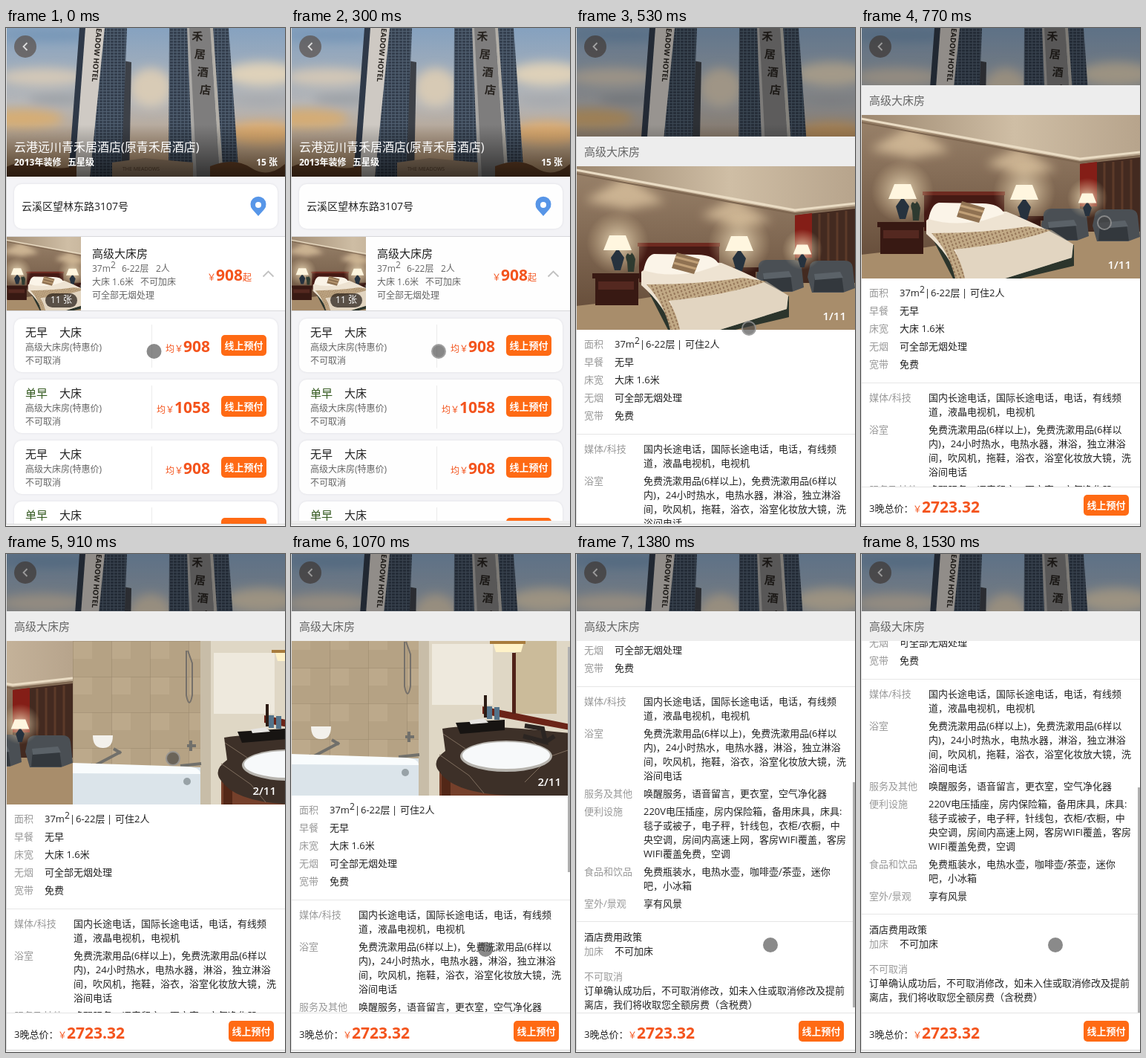
These frames come from a looping animation (376 px wide and 670 px high, 1610 ms). An HTML page:

```html
<!DOCTYPE html>
<html lang="zh">
<head>
<meta charset="utf-8">
<title>房型详情</title>
<style>
html, body { margin: 0; width: 100%; height: 100%; overflow: hidden; background: #f4f4f4; }
body { position: relative; font-family: "Open Sans", "Noto Sans CJK SC", "Noto Sans CJK", sans-serif; }
div, p, svg { position: absolute; box-sizing: border-box; }
p { margin: 0; line-height: 20px; white-space: pre; }
sup { position: relative; top: -5px; font-size: 12px; line-height: 0; vertical-align: baseline; }
b { font-size: 21px; }
#view { left: 0; top: 0; width: 376px; height: 667px; overflow: hidden; background: #f4f4f7; }
#edge { left: 0; top: 0; width: 1px; height: 667px; background: #dcdcdc; }
#foot { left: 0; top: 667px; width: 376px; height: 3px; border-top: 1px solid #d6d6d6; }
.card { left: 11px; width: 355px; background: #fff; border-radius: 10px; box-shadow: 0 0 3px #dcdce2; }
.button { width: 61px; height: 28px; border-radius: 5px; background: #ff6a14; color: #fff;
  font-size: 13px; font-weight: 700; line-height: 28px; text-align: center; }
.rule { height: 1px; left: 0; width: 376px; background: #e6e6e6; }
#page { width: 376px; }
#room { left: 0; top: 280px; width: 376px; height: 101px; background: #fff;
  border: solid #d9d9dc; border-width: 1px 0; }
#badge { left: 53px; top: 357px; width: 43px; height: 19px; border-radius: 10px; background: #1c1510b0;
  color: #fff; font-size: 12px; line-height: 18px; text-align: center; }
#dim { inset: 0; background: #000; }
#sheet { left: 0; top: 77px; width: 376px; height: 590px; background: #fff; }
#head { width: 376px; height: 40px; background: #ededed; }
#scroll { top: 40px; width: 376px; height: 500px; overflow: hidden; }
#body { width: 376px; height: 809px; }
#slides { width: 376px; height: 220px; overflow: hidden; }
#count { right: 12px; top: 191px; font-size: 15px; font-weight: 600; color: #fff; }
#thumb { left: 373px; width: 3px; height: 303px; background: #b0b0b0; }
#bar { top: 540px; width: 376px; height: 50px; background: #fff; border-top: 1px solid #e4e4e4; }
#touch { width: 20px; height: 20px; margin: -10px; border-radius: 50%; background: #444444a0; }
#touch.down { background: #404040a0; border: 2px solid #b0b0b0a0; }
</style>
</head>
<body>
<svg width="0" height="0">
  <defs>
    <filter id="soft" x="-50%" y="-50%" width="200%" height="200%"><feGaussianBlur stdDeviation="7"/></filter>
    <linearGradient id="sky" x2="0" y2="1">
      <stop stop-color="#86a2c0"/><stop offset=".5" stop-color="#b5b6b8"/><stop offset="1" stop-color="#bd9468"/>
    </linearGradient>
    <linearGradient id="shade" x2="0" y2="1">
      <stop offset=".65" stop-opacity="0"/><stop offset="1" stop-opacity=".6"/>
    </linearGradient>
    <linearGradient id="wall" x2="0" y2="1"><stop stop-color="#9a836b"/><stop offset=".9" stop-color="#664d3a"/></linearGradient>
    <linearGradient id="ceiling"><stop stop-color="#9c876f"/><stop offset=".55" stop-color="#cfbea5"/><stop offset="1" stop-color="#b7a48c"/></linearGradient>
    <radialGradient id="glow"><stop stop-color="#fff0cf"/><stop offset="1" stop-color="#e8cfa4" stop-opacity="0"/></radialGradient>
    <pattern id="glass" width="5" height="4" patternUnits="userSpaceOnUse">
      <path fill="#343f4e" d="M0 0h5v4H0z"/><path fill="#516071" d="M0 0h5v1H0zM0 0h1v4H0z"/>
    </pattern>
    <pattern id="weave" width="5" height="5" patternUnits="userSpaceOnUse" patternTransform="rotate(-20)">
      <path fill="#c2aa86" d="M0 0h5v5H0z"/><path fill="#96775a" d="M0 0h2v3H0z"/>
    </pattern>
    <pattern id="tile" width="52" height="48" patternUnits="userSpaceOnUse">
      <path fill="#b5a284" d="M0 0h52v48H0z"/><path fill="#bca98b" d="M0 0h26v24H0z"/>
      <path stroke="#98866b" d="M0 0h52M0 0v48" fill="none"/>
    </pattern>
    <g id="lamp">
      <circle r="42" fill="url(#glow)" opacity=".8"/>
      <path fill="#fff6df" d="M-11-10h22l8 20h-38z"/>
      <path fill="#26323e" d="M-2 10h4l7 10-5 17h-8l-5-17z"/>
    </g>
    <g id="chair">
      <path fill="#4a4f54" d="M3 8q1-8 12-8h35q10 0 11 9l3 28-16 6H6L0 22z"/>
      <path fill="#33383d" d="M10 20h36l3 22H8z"/><path fill="#5b6268" d="M9 18l35-3 4 8-38 3z"/>
    </g>
  </defs>
  <symbol id="hotel" viewBox="0 0 376 200">
    <path fill="url(#sky)" d="M0 0h376v200H0z"/>
    <g filter="url(#soft)">
      <ellipse cx="50" cy="66" rx="58" ry="12" fill="#d3c8b8"/><ellipse cx="22" cy="122" rx="55" ry="13" fill="#d6ad74"/>
      <ellipse cx="70" cy="96" rx="40" ry="7" fill="#9ba0a6"/><ellipse cx="195" cy="80" rx="28" ry="26" fill="#d8cbb6"/>
      <ellipse cx="345" cy="62" rx="50" ry="16" fill="#dfd2ba"/><ellipse cx="345" cy="98" rx="45" ry="7" fill="#a6a9ad"/>
      <ellipse cx="345" cy="142" rx="48" ry="16" fill="#dfae72"/><ellipse cx="60" cy="10" rx="70" ry="7" fill="#7595b6"/>
    </g>
    <path fill="#3d4148" d="M158 44l11 2-3 154h-18z"/>
    <path fill="url(#glass)" d="M132 0h31l-8 200h-42z"/>
    <path fill="#2f3948" d="M99 0h9L93 200h-9z"/>
    <path fill="#cfcac4" d="M107 0h26l-20 200H92z"/>
    <path fill="url(#glass)" d="M220 0h80l14 200h-95z"/>
    <path fill="#aaa8a5" d="M244 0h5l10 200h-7z"/><path fill="#7e7d7d" d="M247 0h28l13 200h-31z"/>
    <path fill="#b3afa8" d="M275 0h4l14 200h-5z"/>
    <g font-weight="700" fill="#27231f">
      <text font-size="10" transform="translate(122 0)rotate(95)">EADOW HOTEL</text>
      <g id="sign" font-size="15"></g>
    </g>
    <path fill="#998169" d="M143 181l44-6 65 6v19H143z"/>
    <text x="157" y="192" font-size="7" fill="#5b442f">THE MEADOWS</text>
    <path fill="#6a4327" d="M0 187q25-12 50-3t45 0v16H0zM275 186q32-13 55 2t46-5v17H275z"/>
    <path fill="url(#shade)" d="M0 0h376v200H0z"/>
  </symbol>
  <symbol id="bedroom" viewBox="0 0 376 220">
    <path fill="url(#wall)" d="M0 0h376v220H0z"/>
    <path fill="#a88d6b" d="M0 188l88-10 155-25 133-3v70H0z"/>
    <g filter="url(#soft)" fill="#e0c7a3" opacity=".75"><path d="M68 14l52 34-52 10-56-12zM215 42l48 32-45 8-50-16z"/></g>
    <path fill="url(#ceiling)" d="M0 0h376v54l-81 8L0 7z"/>
    <path fill="none" stroke="#eadcc4" stroke-width="3" d="M0 5l295 54 81-9"/>
    <path fill="none" stroke="#7d6650" stroke-width="2" d="M0 10l295 54 81-9"/>
    <path fill="#432a20" d="M295 66l81-9v100h-81z"/><path fill="#841e17" d="M295 66l23-3v60h-23z"/>
    <path stroke="#5c3a29" stroke-width="3" d="M328 64v74m12-75v70m12-71v70m12-72v70"/>
    <use href="#chair" x="243" y="126"/><use href="#chair" x="312" y="127"/>
    <path fill="#451a14" d="M85 104h108v52H85z"/><path fill="#6d2a20" d="M83 103h111v5H83z"/>
    <path fill="#381913" d="M22 144h66v7H22zm4 7h58v36H26zM196 136h50v6h-50zm8 6h38v20h-38z"/>
    <path fill="#542820" d="M30 155h48v11H30z"/>
    <use href="#lamp" x="56" y="103"/><use href="#lamp" x="220" y="104"/>
    <use href="#lamp" transform="translate(305 112)scale(.65)"/>
    <path fill="#2e3a30" d="M69 129q-4-9 1-12 4 5 5-1 4 4 5 9l-2 17h-8z"/>
    <path fill="#2c352c" d="M88 150l36 70h91l72-17v-28z"/>
    <path fill="#eee3d2" d="M88 142l22-16 86 4q50 20 90 44l-2 18-90 28h-64q-10-32-42-60z"/>
    <path fill="#d9cab5" d="M128 183l-3-4q80-8 132-24l29 19-2 18-90 28h-58z" opacity=".55"/>
    <path fill="#fbf4e8" d="M91 140q4-20 14-22l58 1q24 0 30 14l-28 9q-42 8-74-2z"/>
    <path fill="url(#weave)" d="M95 159q70 0 130-9l32 5q-50 18-132 26 11 18 15 39h-13q-9-37-32-61z"/>
    <path fill="#907252" d="M136 116l31 9-8 20-30-8z"/><path stroke="#c1a077" stroke-width="3" d="M134 122l31 8m-33 0l30 8"/>
  </symbol>
  <symbol id="bathroom" viewBox="0 0 376 220">
    <path fill="url(#tile)" d="M0 0h172v220H0z"/>
    <path fill="#dfd7c5" d="M172 0h204v220H172z"/><path fill="#c8bda8" d="M172 0h14v220h-14z"/>
    <path fill="#eee9dd" d="M190 16h82v82h-82z"/>
    <path fill="#cbbb9a" d="M302 0h56v110h-56z"/>
    <path fill="#6b2418" d="M258 100l118 24v8l-118-22z"/><path fill="#512219" d="M298 28h5v82h-5z"/>
    <path fill="#fff2c8" d="M272 13h42l-4 14h-34z"/><path fill="#a87c3d" d="M268 12h48v4h-48z"/>
    <path fill="none" stroke="#75706a" stroke-width="2" d="M153 13v60q4 20 8 0V30l-6-17"/>
    <path fill="#f3f1ec" d="M27 127h27q0 18-14 17-13 0-13-17z"/>
    <path fill="none" stroke="#71706b" stroke-width="4" d="M27 169l38-20m-10-4l10 6M24 166l9 6M154 141h12m-7-7v14m-14 20l28-3"/>
    <path fill="#dbe4ea" d="M0 166l172 4v50H0z"/><path fill="#f9fcfd" d="M0 164l155 5q17 1 17 10L0 178z"/>
    <circle cx="154" cy="189" r="5" fill="#98a2a7"/>
    <path fill="#75402b" d="M200 170h176v50H200z"/><path fill="#522717" d="M203 180h12v40h-12z"/>
    <path fill="#3d3028" d="M204 130q40-8 172 6v84H300q-80-2-100-32-12-14 8-28z"/>
    <path fill="none" stroke="#7f6e5e" d="M200 165l40 28 20 24m-55-80l30 20m80 45l35-35 26-9m-60-18l25 20"/>
    <ellipse cx="290" cy="167" rx="62" ry="21" fill="#b7b4ae"/><ellipse cx="290" cy="166" rx="59" ry="18" fill="#f7f9fa"/>
    <path fill="#171412" d="M222 122l66-4v14l-60 5z"/><path fill="#e7e5e2" d="M240 119l20-3 6 6-24 2z"/>
    <path fill="#54738a" d="M264 100h7v17h-7zm10 1h7v17h-7z"/><path fill="#2b1b14" d="M260 85h4v30h-4z"/>
    <path fill="none" stroke="#2b2522" stroke-width="6" d="M315 126l24 4 4 18-30-8m30 8l12-8"/>
  </symbol>
</svg>

<div id="view">
  <div id="page">
    <svg width="376" height="200"><use href="#hotel"/></svg>
    <div class="card" style="top:210px;height:60px"></div>
    <div id="room"></div>
    <svg style="left:1px;top:281px" width="100" height="99" viewBox="25 0 220 218"><use href="#bedroom" width="376" height="220"/></svg>
    <div id="badge">11 张</div>
    <svg width="376" height="400" fill="none">
      <circle cx="26" cy="25" r="15" fill="#5a514bb8"/>
      <path d="M28.500 20l-5 5 5 5" stroke="#ddd" stroke-width="1.800"/>
      <path d="M340 253l-8-9a10.500 10.500 0 1 1 16 0z" fill="#5796e8"/><circle cx="340" cy="238" r="4" fill="#fff"/>
      <path d="M346.500 334.500l7-7 7 7" stroke="#c2c2c2" stroke-width="1.800"/>
    </svg>
  </div>
  <div id="dim"></div>
  <div id="sheet">
    <div id="head"></div>
    <div id="scroll">
      <div id="body">
        <div id="slides">
          <svg id="first" width="376" height="220"><use href="#bedroom"/></svg>
          <svg id="second" width="376" height="220"><use href="#bathroom"/></svg>
          <p id="count"></p>
        </div>
      </div>
      <div id="thumb"></div>
    </div>
    <div id="bar"></div>
  </div>
  <div id="touch"></div>
</div>
<div id="edge"></div>
<div id="foot"></div>

<script>
const $ = id => document.getElementById(id);
const add = (box, html) => box.insertAdjacentHTML('beforeend', html);
const INK = '#222', GRAY = '#666', PALE = '#999', HOT = '#f4541d', BOLD = 'font-weight:700';

// y is the middle of the line; a negative x counts from the right edge
function text(box, x, y, size, color, html, more = '') {
  const side = x < 0 ? `right:${-x}px` : `left:${x}px`;
  add(box, `<p style="${side};top:${y - 10}px;font-size:${size}px;color:${color};${more}">${html}</p>`);
}
const button = (box, x, y) => add(box, `<div class="button" style="left:${x}px;top:${y}px">线上预付</div>`);

const page = $('page'), sheet = $('sheet'), body = $('body');

[...'禾居酒店'].forEach((c, i) =>
  add($('sign'), `<text transform="translate(${250 + i * 3.6} ${16 + i * 24})rotate(5)">${c}</text>`));

text(page, 11, 160, 16, '#fff', '云港远川青禾居酒店(原青禾居酒店)');
text(page, 11, 181, 12, '#fff', '2013年装修', BOLD);
text(page, 83, 181, 12, '#fff', '五星级', BOLD);
text(page, -10, 181, 12, '#fff', '15 张', BOLD);
text(page, 21, 240, 14, INK, '云溪区望林东路3107号');
text(page, 116, 303, 15, INK, '高级大床房');
text(page, 116, 324, 12, GRAY, '37m<sup>2</sup>');
text(page, 156, 324, 12, GRAY, '6-22层');
text(page, 202, 324, 12, GRAY, '2人');
text(page, 116, 342, 12, GRAY, '大床 1.6米');
text(page, 181, 342, 12, GRAY, '不可加床');
text(page, 116, 360, 12, GRAY, '可全部无烟处理');
text(page, -45, 332, 12, HOT, '￥<b>908</b>起');

[908, 1058, 908, 1058].forEach((price, i) => {
  const y = 391 + i * 82, meal = i % 2;
  add(page, `<div class="card" style="top:${y}px;height:72px"></div>
    <div style="left:196px;top:${y + 8}px;width:1px;height:58px;background:#ececec"></div>`);
  text(page, 26, y + 18, 15, meal ? '#33591f' : INK, meal ? '单早' : '无早');
  text(page, 72, y + 18, 15, INK, '大床');
  text(page, 26, y + 39, 12, GRAY, '高级大床房(特惠价)');
  text(page, 26, y + 57, 12, GRAY, '不可取消');
  text(page, -101, y + 37, 12, HOT, `均￥<b>${price}</b>`);
  button(page, 290, y + 22);
});

text(sheet, 11, 20, 15, GRAY, '高级大床房');
text(sheet, 11, 569, 13, INK, '3晚总价：');
text(sheet, 70, 567, 12, HOT, '￥<b>2723.32</b>');
button(sheet, 300, 551);

[['面积', '37m<sup>2</sup>'], ['早餐', '无早'], ['床宽', '大床 1.6米'], ['无烟', '可全部无烟处理'], ['宽带', '免费']]
  .forEach(([label, value], i) => {
    text(body, 11, 239 + i * 24, 13, PALE, label);
    text(body, 52, 239 + i * 24, 13, INK, value);
  });
text(body, 86, 239, 13, INK, '|');
text(body, 94, 239, 13, INK, '6-22层');
text(body, 136, 239, 13, INK, '|');
text(body, 147, 239, 13, INK, '可住2人');

let y = 380;
for (const [label, ...lines] of [
  ['媒体/科技', '国内长途电话，国际长途电话，电话，有线频', '道，液晶电视机，电视机'],
  ['浴室', '免费洗漱用品(6样以上)，免费洗漱用品(6样以', '内)，24小时热水，电热水器，淋浴，独立淋浴',
    '间，吹风机，拖鞋，浴衣，浴室化妆放大镜，洗', '浴间电话'],
  ['服务及其他', '唤醒服务，语音留言，更衣室，空气净化器'],
  ['便利设施', '220V电压插座，房内保险箱，备用床具，床具:', '毯子或被子，电子秤，针线包，衣柜/衣橱，中',
    '央空调，房间内高速上网，客房WIFI覆盖，客房', 'WIFI覆盖免费，空调'],
  ['食品和饮品', '免费瓶装水，电热水壶，咖啡壶/茶壶，迷你', '吧，小冰箱'],
  ['室外/景观', '享有风景'],
]) {
  text(body, 11, y, 13, PALE, label);
  lines.forEach((line, i) => text(body, 91, y + i * 19, 13, INK, line));
  y += 24 + 19 * (lines.length - 1);
}
add(body, '<div class="rule" style="top:360px"></div><div class="rule" style="top:676px"></div>');
text(body, 11, 697, 13, INK, '酒店费用政策');
text(body, 11, 716, 13, PALE, '加床');
text(body, 52, 716, 13, INK, '不可加床');
text(body, 11, 750, 13, PALE, '不可取消');
text(body, 11, 769, 13, INK, '订单确认成功后，不可取消修改，如未入住或取消修改及提前');
text(body, 11, 788, 13, INK, '离店，我们将收取您全额房费（含税费）');

const LOOP = 1610;
// the picture is held until the next of these times
const TICKS = [0, 130, 300, 380, 450, 530, 590, 680, 770, 830, 910, 990, 1070, 1150, 1210, 1300, 1380, 1450, 1530];
const PATH = [[0, 199.5, 435], [300, 199, 435], [380, 198, 434], [530, 233, 404], [770, 328, 262],
  [830, 285, 262], [910, 225, 275], [990, 240, 410], [1070, 262, 532], [1210, 262, 526], [LOOP, 262, 526]];

// cubic-bezier(.25, .1, .25, 1)
function ease(p) {
  if (p <= 0) return 0;
  if (p >= 1) return 1;
  const curve = (u, a, b) => 3 * (1 - u) ** 2 * u * a + 3 * (1 - u) * u * u * b + u ** 3;
  let lo = 0, hi = 1;
  for (let i = 0; i < 20; i++) {
    const mid = (lo + hi) / 2;
    if (curve(mid, .25, .25) < p) lo = mid; else hi = mid;
  }
  return curve(lo, .1, 1);
}

function touchAt(t) {
  const i = PATH.findIndex(k => k[0] > t), [t0, x0, y0] = PATH[i - 1], [t1, x1, y1] = PATH[i];
  const p = (t - t0) / (t1 - t0);
  return [x0 + (x1 - x0) * p, y0 + (y1 - y0) * p];
}

function draw(t) {
  const open = ease((t - 291) / 400);
  const slide = ease((t - 790) / 260);
  const scroll = Math.round(309 * ease((t - 1046) / 430));
  const [x, y] = touchAt(t);
  $('dim').style.opacity = .3 * open;
  sheet.style.transform = `translateY(${Math.round(593 * (1 - open))}px)`;
  $('first').style.left = -376 * slide + 'px';
  $('second').style.left = 376 * (1 - slide) + 'px';
  $('count').textContent = (slide < .5 ? 1 : 2) + '/11';
  body.style.top = -scroll + 'px';
  $('thumb').style.top = scroll * .637 + 'px';
  $('thumb').style.opacity = scroll ? 1 : 0;
  $('touch').style.transform = `translate(${x}px, ${y}px)`;
  $('touch').className = t >= 130 && t < 990 ? 'down' : '';
}

const start = performance.now();
function tick() {
  const now = (performance.now() - start) % LOOP;
  draw(TICKS.findLast(t => t <= now));
  requestAnimationFrame(tick);
}
tick();
</script>
</body>
</html>
```
